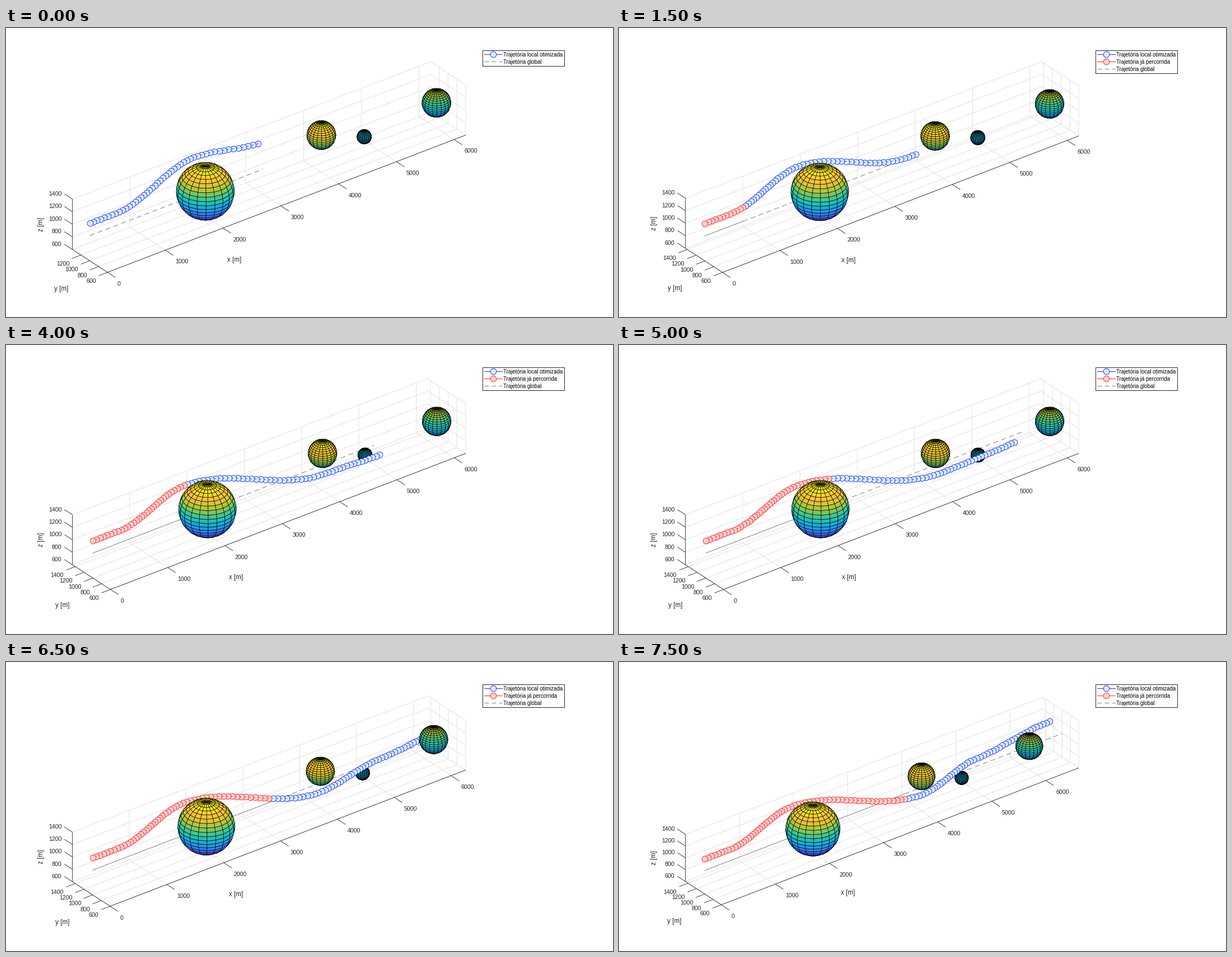
A matplotlib script for the animation above (8000 ms loop, 1084x517 px).

```python
import numpy as np
import matplotlib.pyplot as plt
from matplotlib.animation import FuncAnimation
from matplotlib.collections import LineCollection, PolyCollection
from matplotlib.colors import LinearSegmentedColormap
from matplotlib.patches import Rectangle

W, H, DPI = 1084, 517, 100
PT = 72 / DPI  # points per pixel
FRAMES, INTERVAL = 16, 500
STEP, HORIZON = 4, 48  # points flown per frame, points planned ahead

plt.rcParams["font.family"] = "Liberation Sans"
plt.rcParams["lines.scale_dashes"] = False

AZ, EL = np.radians(37.5), np.radians(30)
CA, SA, CE, SE = np.cos(AZ), np.sin(AZ), np.cos(EL), np.sin(EL)
LEFT, RIGHT, MIDDLE = 118.5, 821, 248.8  # where the axes box is fitted
LOW, TOP, BASE = 600, 1400, 1000
INK, GRID, GREY = "#262626", "#dfdfdf", "#606060"
BLUE, RED = ("#0000ff", "#d2efff"), ("#ff0000", "#ffd0d0")

PARULA = LinearSegmentedColormap.from_list("parula", [
    (.2422, .1504, .6603), (.2810, .3228, .9579), (.1786, .5289, .9682),
    (.0689, .6948, .8394), (.2161, .7843, .5923), (.6720, .7793, .2227),
    (.9970, .7659, .2199), (.9769, .9839, .0805)])

# x, y, z, radius, drawing order
SPHERES = [(2000, 1000, 1000, 400, 6), (4000, 990, 1195, 200, 6),
           (4750, 1000, 900, 100, 3), (6000, 1000, 1000, 200, 6)]

# How the plan changes: its valley, its end and the end of the global line
KEYS = [0, 2, 5, 8, 12, 14, 15]
VALLEY_X = [3050, 3400, 3800, 4100, 4100, 3940, 4040]
VALLEY_H = [430, 55, -58, -152, -163, -123, -123]
REACH = [2914, 3434, 4143, 5004, 5757, 6053, 6377]
GOAL = [3000, 3470, 4100, 4907, 6150, 6367, 6607]


def flatten(x, y, z):
    """Orthographic view: metres to right and down on the screen."""
    return np.stack([CA * x - SA * y, -SE * (SA * x + CA * y) - CE * z], -1)


class View:
    """Axes limits of one frame and their fit on the stage."""

    def __init__(self, k):
        self.goal = np.interp(k, KEYS, GOAL)
        self.xmax = max(6200, self.goal)
        self.ymax = 1466 - 73 * np.exp(-k * k / 8)
        depth = self.ymax - LOW
        self.scale = (RIGHT - LEFT) / (CA * self.xmax + SA * depth)
        tall = SE * (SA * self.xmax + CA * depth) + CE * (TOP - LOW)
        self.corner = np.array([LEFT + SA * depth * self.scale,
                                MIDDLE + tall * self.scale / 2])

    def at(self, x, y, z):
        return self.corner + self.scale * flatten(x, y - LOW, z - LOW)

    def track(self, x, h=0):
        """Point at distance x, raised by h over the global line."""
        return self.at(x, BASE + 0 * x, BASE + h)


def height(x, k):
    """Eased climbs and dips between the turning points of the plan."""
    xs = np.array([480, 1580 + 200 * np.exp(-.8 * k),
                   np.interp(k, KEYS, VALLEY_X), 5000, 6300])
    hs = np.array([198, 525 + 87 * np.exp(-.5 * k),
                   np.interp(k, KEYS, VALLEY_H),
                   np.interp(k, [8, 12, 14], [-184, -89, 135]),
                   np.interp(k, [12, 14], [-20, 285])])
    j = np.clip(np.searchsorted(xs, x) - 1, 0, len(xs) - 2)
    t = np.clip((x - xs[j]) / (xs[j + 1] - xs[j]), 0, 1)
    return hs[j] + (hs[j + 1] - hs[j]) * t * t * (3 - 2 * t)


def plan(k):
    """Evenly timed points: slower uphill, faster downhill."""
    x = np.arange(0, 9000, 5.0)
    pace = 62 - 46 * np.gradient(height(x, k), x)
    time = np.cumsum(5 / pace) - 5 / pace[0]
    i = np.arange(STEP * k + HORIZON)
    px = np.interp(i, time, x)
    ahead = np.clip((i - STEP * k) / (HORIZON - 1), 0, 1)
    px += (np.interp(k, KEYS, REACH) - px[-1]) * ahead ** 2
    return px, height(px, k)


def sphere_faces(n=20):
    """Visible faces of a unit sphere and the height of their lower edge."""
    lat = np.linspace(-np.pi / 2, np.pi / 2, n + 1)[:, None]
    lon = np.linspace(-np.pi, np.pi, n + 1)[None, :]
    up = np.sin(lat) + 0 * lon
    g = flatten(np.cos(lat) * np.cos(lon), np.cos(lat) * np.sin(lon), up)
    quads = np.stack([g[:-1, :-1], g[:-1, 1:], g[1:, 1:], g[1:, :-1]], 2)
    quads = quads.reshape(-1, 4, 2)
    low = up[:-1, :-1].ravel()
    d, e = quads[:, 2] - quads[:, 0], quads[:, 3] - quads[:, 1]
    front = d[:, 0] * e[:, 1] - d[:, 1] * e[:, 0] < -1e-9
    return quads[front], low[front]


FACES, FACE_LOW = sphere_faces()

fig = plt.figure(figsize=(W / DPI, H / DPI), dpi=DPI, facecolor="white")
ax = fig.add_axes([0, 0, 1, 1])


def label(x, y, s, size=10.67, ha="center", color=INK):
    ax.text(x, y + .36 * size, s, fontsize=size * PT, ha=ha, va="baseline",
            color=color, zorder=8)


def lines(segs, color, width, z):
    ax.add_collection(LineCollection(segs, colors=color, linewidths=width * PT,
                                     zorder=z))


def stroke(p, q, color=GREY, width=.8, z=2, **kw):
    ax.plot([p[0], q[0]], [p[1], q[1]], color=color, lw=width * PT, zorder=z, **kw)


def dashes(on, off):
    return (0, (on * PT, off * PT))


def marker(colors, **kw):
    return dict(marker="o", ms=10.67 * PT, mew=.75 * PT, mec=colors[0],
                mfc=colors[1], **kw)


def draw_box(v):
    at, X, Y = v.at, v.xmax, v.ymax
    xs = range(0, int(X) + 1, 1000)
    ys = range(LOW, int(Y) + 1, 200)
    zs = range(LOW, TOP + 1, 200)
    lines([[at(x, LOW, LOW), at(x, Y, LOW), at(x, Y, TOP)] for x in xs]
          + [[at(0, y, LOW), at(X, y, LOW), at(X, y, TOP)] for y in ys]
          + [[at(0, Y, z), at(X, Y, z), at(X, LOW, z)] for z in zs],
          GRID, .9, 0)

    along_y = 17 * np.array([.838, .546])
    along_x = 17 * np.array([-.934, .358])
    edges = [[at(X, LOW, LOW), at(0, LOW, LOW), at(0, Y, LOW), at(0, Y, TOP)]]
    for x in xs:
        p = at(x, LOW, LOW)
        edges.append([p, p + along_y])
        label(p[0] + 17.7, p[1] + 20, x, ha="left")
    for y in ys:
        p = at(0, y, LOW)
        edges.append([p, p + along_x])
        label(p[0] - 20.5, p[1] + 15, y, ha="right")
    for z in zs:
        p = at(0, Y, z)
        edges.append([p, p - along_y])
        label(p[0] - 19, p[1] - 10, z, ha="right")
    lines(edges, INK, .85, 1)

    mid = (at(0, LOW, LOW) + at(X, LOW, LOW)) / 2
    label(mid[0] - 93, mid[1] + 99.5, "x [m]", 11.73)
    mid = (at(0, LOW, LOW) + at(0, Y, LOW)) / 2
    label(mid[0] - 51.5, mid[1] + 49.5, "y [m]", 11.73)
    mid = (at(0, Y, LOW) + at(0, Y, TOP)) / 2
    ax.text(63, mid[1], "z [m]", fontsize=11.73 * PT, rotation=90, ha="center",
            va="center", color=INK)


def draw_spheres(v):
    for x, y, z, r, order in SPHERES:
        quads = v.at(x, y, z) + r * v.scale * FACES
        colors = PARULA((z + r * FACE_LOW - LOW) / (TOP - LOW))
        ax.add_collection(PolyCollection(quads, facecolors=colors,
                                         edgecolors="black",
                                         linewidths=.67 * PT, zorder=order))


def draw_global(v, flown_x):
    start, here, goal = v.track(0), v.track(flown_x), v.track(v.goal)
    stroke(start, here)
    stroke(here, goal, ls=dashes(9, 6))


def draw_path(pts, flown):
    # Nearer points cover the farther ones and their links
    last = len(pts) - 1
    for i, p in enumerate(pts):
        colors = RED if i < flown else BLUE
        stroke(p, pts[min(i + 1, last)], colors[0], .75, 5 - i / 200,
               markevery=[0], **marker(colors))


def draw_legend(k):
    rows = [("Trajetória local otimizada", BLUE), ("Trajetória global", None)]
    if k:
        rows.insert(1, ("Trajetória já percorrida", RED))
    ax.add_patch(Rectangle((850.5, 39.5), 146, 2 + 13 * len(rows),
                           fc="white", ec=INK, lw=PT, zorder=7))
    for n, (name, colors) in enumerate(rows):
        y = 47.3 + 13 * n
        if colors:
            stroke((853.5, y), (885.5, y), colors[0], .85, 8)
            ax.plot([869.5], [y], ls="none", zorder=9, **marker(colors))
        else:
            stroke((853.5, y), (885.5, y), z=8, ls=dashes(8, 5))
        label(887.5, y + .3, name, 9.6, "left", "black")


def draw(k):
    ax.cla()
    ax.set_xlim(0, W)
    ax.set_ylim(H, 0)
    ax.axis("off")
    v = View(k)
    flown = STEP * k
    x, h = plan(k)
    draw_box(v)
    draw_global(v, x[max(flown - 1, 0)])
    draw_path(v.track(x, h), flown)
    draw_spheres(v)
    draw_legend(k)
    return []


anim = FuncAnimation(fig, draw, frames=FRAMES, interval=INTERVAL,
                     init_func=lambda: draw(0), repeat=True, repeat_delay=0)
plt.show()
```
